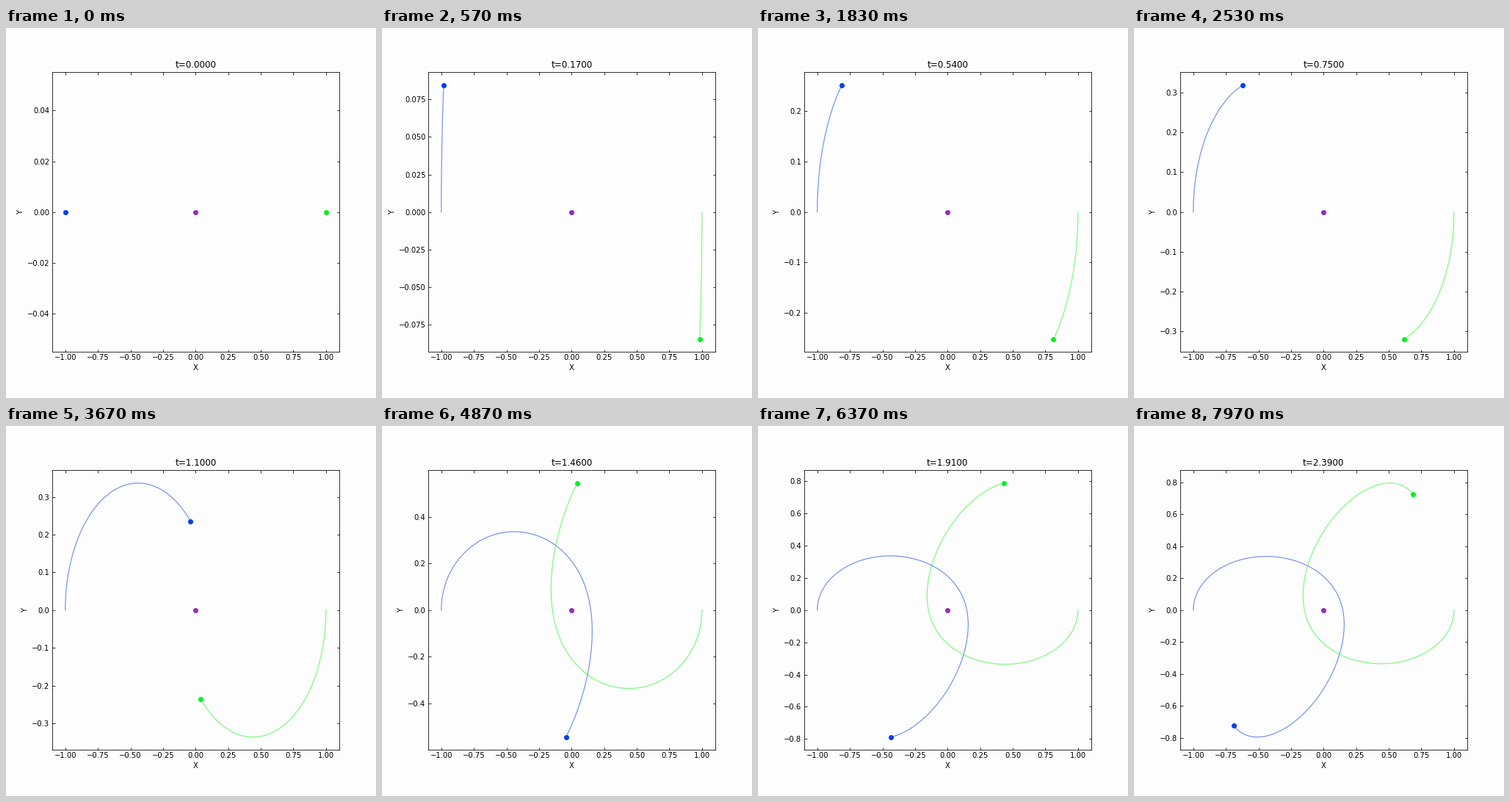
Write a matplotlib script that moves like this. It is 504 px wide and 504 px high and loops after 8000 ms.

```python
import numpy as np
import matplotlib.pyplot as plt
from matplotlib.animation import FuncAnimation

LOOP_MS = 8000
FRAMES = 240
DT = 0.01
SUBSTEPS = 10
SOFTENING = 0.1
PAPER = "#fdfdfd"
COLORS = ["#0540ea", "#9030be", "#06f026"]
TRAILS = ["#0838df", "#9030be", "#14f41c"]


def acceleration(pos):
    """Softened gravity between equal unit masses."""
    gap = pos[None, :, :] - pos[:, None, :]
    dist2 = (gap ** 2).sum(axis=2) + SOFTENING ** 2
    return (gap * dist2[:, :, None] ** -1.5).sum(axis=1)


def simulate(steps):
    """Leapfrog integration; returns positions as (step, body, axis)."""
    pos = np.array([[-1.0, 0.0], [0.0, 0.0], [1.0, 0.0]])
    vel = np.array([[0.0, 0.5], [0.0, 0.0], [0.0, -0.5]])
    acc = acceleration(pos)
    h = DT / SUBSTEPS
    path = [pos.copy()]
    for _ in range(steps - 1):
        for _ in range(SUBSTEPS):
            vel += acc * h / 2
            pos += vel * h
            acc = acceleration(pos)
            vel += acc * h / 2
        path.append(pos.copy())
    return np.array(path)


path = simulate(FRAMES)

plt.rcParams.update({
    "font.family": "DejaVu Sans",
    "font.size": 10,
    "xtick.direction": "in",
    "ytick.direction": "in",
    "xtick.top": True,
    "ytick.right": True,
    "figure.subplot.bottom": 0.125,
})
fig, ax = plt.subplots(figsize=(7, 7), dpi=72, facecolor=PAPER)
ax.set_facecolor(PAPER)
ax.set_xlabel("X")
ax.set_ylabel("Y")
title = ax.set_title("", fontsize=12)

trails = [ax.plot([], [], color=c, lw=1.2, alpha=0.55)[0] for c in TRAILS]
dots = [ax.plot([], [], "o", color=c, ms=6)[0] for c in COLORS]


def update(i):
    for body in range(3):
        xs, ys = path[:i + 1, body].T
        trails[body].set_data(xs, ys)
        dots[body].set_data(xs[-1:], ys[-1:])
    title.set_text(f"t={i * DT:.4f}")
    ax.relim()
    ax.autoscale_view()
    return trails + dots + [title]


anim = FuncAnimation(fig, update, frames=FRAMES, interval=LOOP_MS / FRAMES,
                     init_func=lambda: update(0), repeat=True, repeat_delay=0,
                     blit=False)
plt.show()
```
